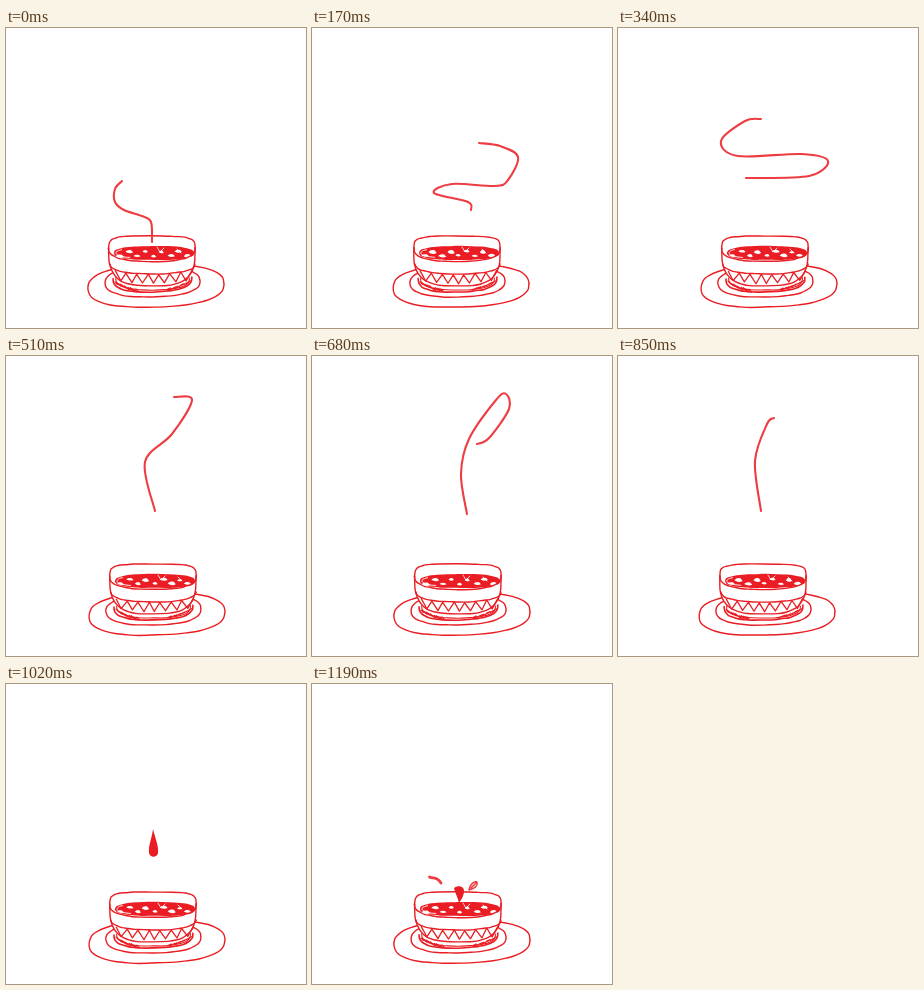
An HTML page for the animation above (1.36 s loop, 300 by 300 pixels).

```html
<!DOCTYPE html>
<html lang="en">
<head>
<meta charset="utf-8">
<title>Hot soup</title>
<style>
html, body { margin: 0; width: 100%; height: 100%; overflow: hidden; background: #fff; }
svg { display: block; width: 100vw; height: 100vh; }
path { stroke-linecap: round; stroke-linejoin: round; }
</style>
</head>
<body>
<svg viewBox="0 0 300 300">
  <g id="bowl"></g>
  <g id="steam"></g>
</svg>
<script>
const STEP = 170, POSES = 8, RED = '#e91d23', PALE = '#ee3d42';
const bowl = document.getElementById('bowl');
const steam = document.getElementById('steam');

function random(seed) {
  return () => {
    seed = (seed * 16807) % 2147483647;
    return seed / 2147483647;
  };
}

// Smooth curve through a list of points
function curve(p) {
  let d = `M${p[0]}`;
  for (let i = 0; i < p.length - 1; i++) {
    const a = p[i - 1] || p[i], b = p[i], c = p[i + 1], e = p[i + 2] || c;
    d += `C${b[0] + (c[0] - a[0]) / 6} ${b[1] + (c[1] - a[1]) / 6} ` +
         `${c[0] - (e[0] - b[0]) / 6} ${c[1] - (e[1] - b[1]) / 6} ${c[0]} ${c[1]}`;
  }
  return d;
}

const points = text => text.split(' ').map(s => s.split(',').map(Number));
const line = (d, width = 1.4, color = RED) =>
  `<path d="${d}" fill="none" stroke="${color}" stroke-width="${width}"/>`;
const fill = (d, color = RED) => `<path d="${d}" fill="${color}"/>`;

// Hand-drawn rounded oval; the angle range is in turns, 0 to 0.5 is the lower half
function oval(rnd, x, y, rx, ry, { power = 2.6, from = 0, to = 1, tilt = 0 } = {}) {
  const bend = v => Math.sign(v) * Math.abs(v) ** (2 / power);
  const count = Math.round(32 * (to - from)), p = [];
  for (let i = 0; i <= count; i++) {
    const a = 2 * Math.PI * (from + (to - from) * i / count);
    const dx = rx * bend(Math.cos(a));
    p.push([x + dx + (rnd() - .5) * .5, y + ry * bend(Math.sin(a)) + tilt * dx + (rnd() - .5) * .5]);
  }
  return curve(p);
}

function zigzag(rnd) {
  const p = [];
  for (let i = 0; i <= 14; i++) {
    const x = 109 + i * 5.5, sag = 1 - ((x - 146) / 42) ** 2;
    p.push([x + rnd() - .5, (i % 2 ? 251 : 242) + sag * 4.5 + rnd() - .5]);
  }
  return 'M' + p.join('L');
}

// Short strokes along the foot, darkest at both ends
function hatch(rnd) {
  let d = '';
  for (let i = 0; i < 12; i++) {
    const x = 109 + i * 1.9, y = 253 + 8 * Math.sin(i / 8);
    d += `M${x} ${y + rnd()}l2.5 2.5M${294 - x} ${y - 1 + rnd()}l-3 1.5`;
  }
  return d;
}

function soup(rnd) {
  let d = '';
  for (let i = 0; i < 9; i++) {
    const x = 113 + i * 8.4 + rnd() * 2, y = (i % 2 ? 223 : 227) + rnd() * 1.5;
    const w = 2.5 + rnd() * 2, h = 1 + rnd();
    d += `M${x - w} ${y}Q${x - w / 2} ${y - h * 1.6} ${x + w * .5} ${y - h}L${x + w} ${y + h * .4}Q${x} ${y + h * 1.6} ${x - w} ${y}`;
  }
  return fill(oval(rnd, 148, 225, 40, 7)) + fill(d, '#fff') +
    line(oval(rnd, 146, 225, 36, 5, { from: .34, to: .6 }), .9, '#fff') +
    line('M151 219l3 5l4 -4M171 221l4 4', .8, '#fff');
}

function drawBowl(shift) {
  const rnd = random(31 + shift * 9);
  const body = oval(rnd, 146, 220, 43.3, 38, { power: 3.1, to: .5 });
  return `<g transform="translate(${shift} 0)">` +
    line(oval(rnd, 150, 258, 68, 21, { power: 2.45, tilt: -.03 })) +
    line(oval(rnd, 146.5, 254, 47.5, 15, { power: 2.4, tilt: -.02 })) +
    line(oval(rnd, 146.5, 250, 39.5, 14, { to: .5, tilt: -.02 }), 1.6) +
    line(oval(rnd, 146.5, 250, 37, 12, { to: .5 }), 1.1) +
    line(hatch(rnd), 1.2) +
    fill(body, '#fff') +
    soup(rnd) +
    line(oval(rnd, 146, 221, 43.3, 13, { power: 4, from: .5 })) +
    line(oval(rnd, 146, 220, 43.3, 13.5, { to: .5 })) +
    line(body) +
    line(oval(rnd, 146.5, 236, 42.5, 10, { power: 2.3, to: .5 })) +
    line(zigzag(rnd), 1.3) + '</g>';
}

// Key points of the rising steam, from its head to its tail
const wisps = [
  '116,153 109,161 109,174 118,182 136,188 145,194 146,214',
  '167,115 188,118 206,129 196,152 183,158 140,156 122,165 156,174 159,182',
  '143,91 127,93 103,113 120,128 184,126 210,133 191,148 128,150',
  '168,41 186,44 166,78 139,106 149,155',
  '165,88 177,82 197,53 194,38 184,44 157,83 149,118 155,158',
  '156,62 149,68 137,105 143,155'
].map(points);

function drawSteam(pose) {
  if (pose < wisps.length) return line(curve(wisps[pose]), 2.1, PALE);
  if (pose === wisps.length)
    return fill('M147 145C149 154 153 162 152 169C151 174 144 174 143 169C142 162 146 154 147 145Z');
  return fill('M142 204C146 201 152 202 152 207C152 212 149 216 147 219C146 214 143 209 142 204Z') +
    line('M117.5 193C121 195 125 192 129 199', 2.8, PALE) +
    line('M157 206C158 200 162 197 165 198C166 202 162 205 157 206M159 204L164 199', 1.5, PALE);
}

// The bowl rocks by a pixel, and rests for one step at the top of the rise
const sway = pose => (pose - (pose > 2)) % 3;
const bowls = [0, -1, 1].map(drawBowl);
let shown = -1;

function draw(time) {
  const pose = Math.floor(time / STEP) % POSES;
  if (pose === shown) return;
  shown = pose;
  bowl.innerHTML = bowls[sway(pose)];
  steam.innerHTML = drawSteam(pose);
}

const start = performance.now();
function tick() {
  draw(performance.now() - start);
  requestAnimationFrame(tick);
}
tick();
</script>
</body>
</html>
```
